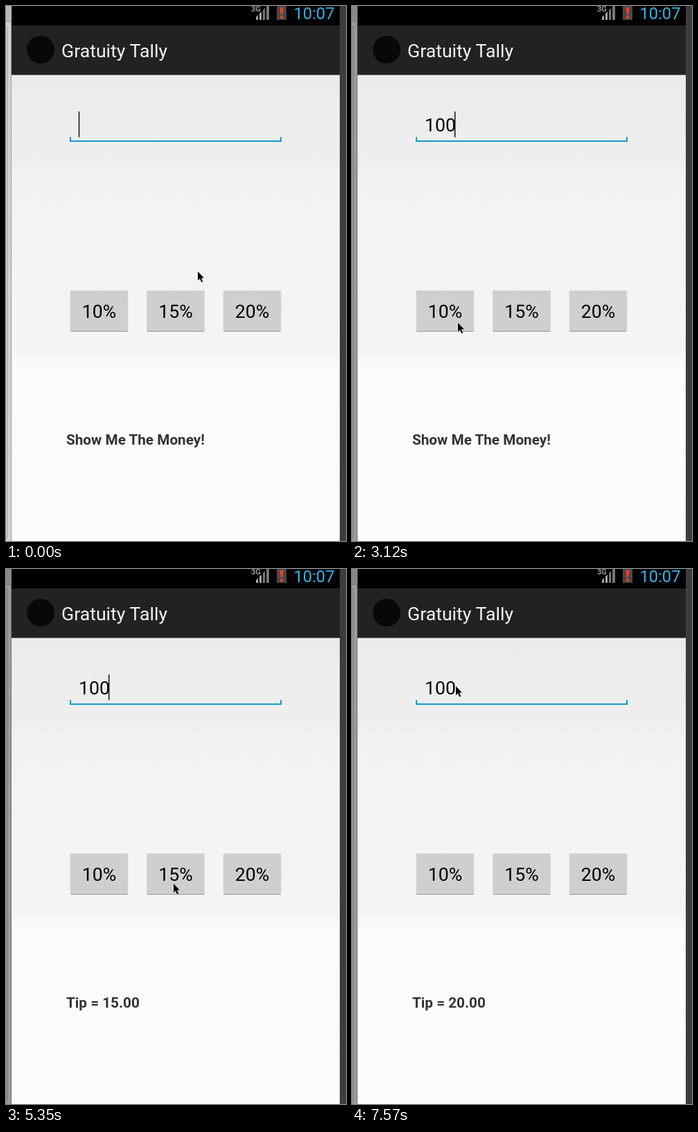
Animation of 491x772 px, one loop 8000 ms. Source, as an HTML page:

```html
<!DOCTYPE html>
<html lang="en">
<head>
<meta charset="utf-8">
<title>Gratuity Tally</title>
<style>
  html, body { margin: 0; width: 100%; height: 100%; overflow: hidden; background: #3d3d3d; }
  svg { display: block; width: 491px; height: 772px; }
  text { font-family: Roboto, sans-serif; font-size: 26.67px; fill: #000; }
  .face { fill: #cfcfcf; }
  .shade { stroke: #959595; }
  .glow { fill: none; }
  .pressed .face { fill: #99cbdf; }
  .pressed .glow { fill: #33b5e5; fill-opacity: .35; }
</style>
</head>
<body>
<svg viewBox="0 0 491 772">
  <defs>
    <linearGradient id="page" gradientUnits="userSpaceOnUse" x1="0" y1="99" x2="0" y2="772">
      <stop offset="0" stop-color="#ebebeb"/>
      <stop offset=".2" stop-color="#efefef"/>
      <stop offset=".21" stop-color="#f2f2f2"/>
      <stop offset=".59" stop-color="#f4f4f4"/>
      <stop offset=".62" stop-color="#fbfbfb"/>
      <stop offset="1" stop-color="#fcfcfc"/>
    </linearGradient>
  </defs>

  <!-- window behind -->
  <rect id="behind" width="8" height="772"/>
  <path d="M0 0H8V22H0z" fill-opacity=".12"/>
  <path d="M0 22.5H8M0 28.5q2 0 2 3V766q0 2-2 2M7.5 23V772" fill="none" stroke="#000" stroke-opacity=".25"/>

  <!-- phone screen -->
  <rect x="8" y="99" width="474" height="673" fill="url(#page)"/>
  <rect x="8" width="474" height="28" fill="#000"/>
  <rect x="8" y="28" width="474" height="71.5" fill="#222"/>
  <circle cx="50" cy="63" r="20" fill="#080808"/>
  <text x="80" y="74" style="fill:#f3f3f3">Gratuity Tally</text>

  <!-- status icons -->
  <text x="354" y="8" style="font-size:11px;font-weight:bold;fill:#999">3G</text>
  <path d="M361 20v-4l3-3v7zM366 20v-9l3-3v12z" fill="#aaa"/>
  <path d="M371 20v-14l3-3v17zM376 20v-19l4-4v23z" fill="#777"/>
  <rect x="391" y="-2" width="14" height="22" fill="#484848"/>
  <path d="M395.500 2h5l-1 10h-3zM396 14h4v4h-4z" fill="#ff3b1d"/>
  <text x="415.5" y="19" style="font-size:23.7px;fill:#33b5e5">10:07</text>

  <!-- amount field -->
  <path d="M93 189V195H397V189" fill="none" stroke="#0f9bcb" stroke-width="2"/>
  <text id="amount" x="105" y="181"></text>
  <rect id="caret" y="152.3" width="1.5" height="37" fill="#111"/>

  <g id="buttons"></g>
  <text id="label" x="87" y="633" style="font-size:20.74px;font-weight:bold;fill:#333"></text>
  <path id="pointer" d="M1 1V14L4 11.500L6.200 16.500L8.200 15.700L6 10.500H10Z"
        stroke="#fff" paint-order="stroke"/>
</svg>
<script>
  const LOOP = 8000, TICK = 148.5, BLINK = 500;
  const $ = id => document.getElementById(id);

  const rates = [10, 15, 20];
  const bill = '100';
  const keystrokes = [9, 12, 13];
  const focusTick = 6;

  // Pointer moves, in ticks; bow bends a move sideways
  const home = { x: 276, y: 382 };
  const moves = [
    { start: 0, end: 5, x: 185, y: 182, bow: 0 },
    { start: 15, end: 21, x: 152, y: 456, bow: -40 },
    { start: 27, end: 33, x: 241, y: 453, bow: 0 },
    { start: 36, end: 40, x: 335, y: 445, bow: 0 },
    { start: 43, end: 49, x: 149, y: 168, bow: -30 }
  ];
  // Each button is pressed shortly after the pointer reaches it
  const presses = rates.map((_, i) => moves[i + 1].end + 2);

  $('buttons').innerHTML = rates.map((rate, i) => `
    <g class="button" transform="translate(${93 + i * 110.5} 411)">
      <rect class="glow" x="-5.5" y="-6.5" width="94" height="71" rx="4"/>
      <rect class="face" x="-.3" y="-.5" width="83.6" height="59" rx="1.5"/>
      <path class="shade" d="M.5 58.500H82.500"/>
      <text x="41.5" y="39" text-anchor="middle">${rate}%</text>
    </g>`).join('');
  const buttons = document.querySelectorAll('.button');

  function pointerAt(tick) {
    let { x, y } = home;
    for (const move of moves) {
      const k = Math.min(1, Math.max(0, (tick - move.start) / (move.end - move.start)));
      const eased = k * k * (3 - 2 * k);
      x += (move.x - x) * eased + move.bow * Math.sin(Math.PI * k);
      y += (move.y - y) * eased;
    }
    return [Math.round(x), Math.round(y)];
  }

  function draw(time) {
    const tick = Math.floor((time % LOOP + 4.9) / TICK);
    const keys = keystrokes.filter(key => key <= tick);
    const tips = presses.filter(press => press < tick).length;

    $('amount').textContent = bill.slice(0, keys.length);
    $('label').textContent = tips
      ? `Tip = ${(bill * rates[tips - 1] / 100).toFixed(2)}`
      : 'Show Me The Money!';

    // Typing restarts the caret's blink
    const idle = (tick - (keys.at(-1) ?? 0)) * TICK;
    $('caret').setAttribute('x', 104.75 + keys.length * 14.4);
    $('caret').style.display = Math.floor(idle / BLINK) % 2 ? 'none' : '';

    $('pointer').setAttribute('transform', `translate(${pointerAt(tick)})`);
    buttons.forEach((button, i) => button.classList.toggle('pressed', tick === presses[i]));
    $('behind').style.fill = tick < focusTick ? '#d2d2d2' : '#9b9b9b';
  }

  function loop(now) {
    draw(now);
    requestAnimationFrame(loop);
  }
  draw(0);
  requestAnimationFrame(loop);
</script>
</body>
</html>
```
